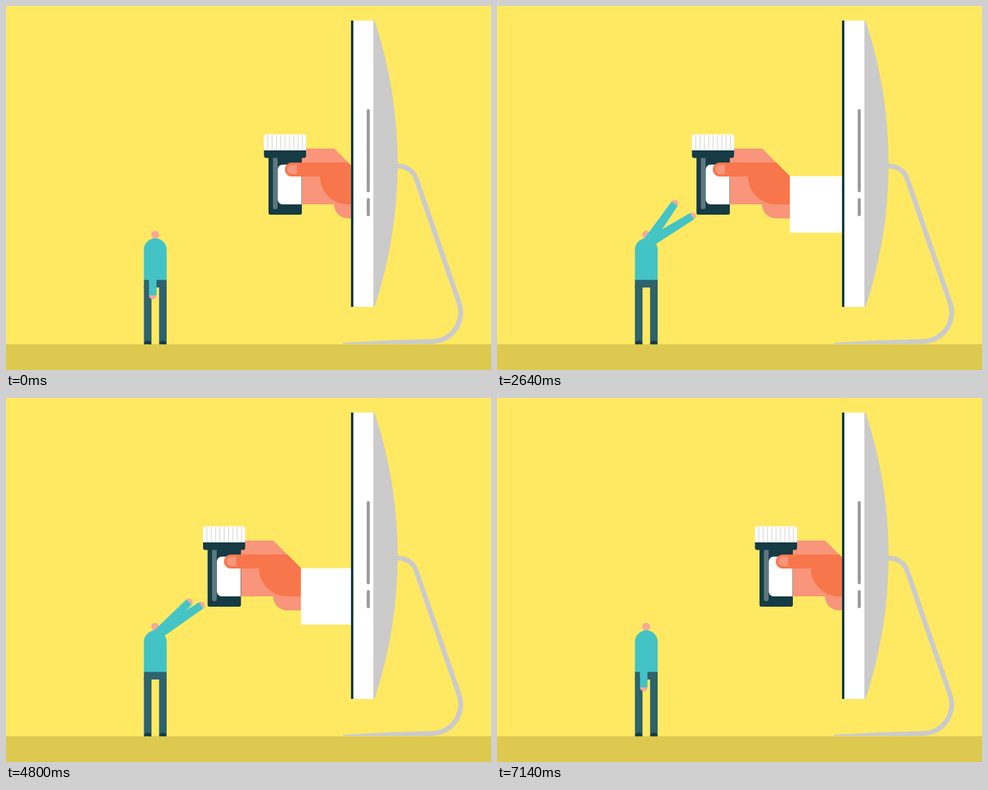
Recreate the animation shown at these times as an HTML page with a canvas. Size 800 by 600 pixels, loop 7.17 s.

```html
<!DOCTYPE html>
<html lang="en">
<head>
<meta charset="utf-8">
<title>Remote pharmacy</title>
<style>
  html, body { margin: 0; width: 100%; height: 100%; overflow: hidden; background: #ffe963; }
  canvas { display: block; width: 800px; height: 600px; }
</style>
</head>
<body>
<canvas id="stage" width="800" height="600"></canvas>
<script>
const LOOP = 7170, STEP = 30, MIRROR = 7178;
const SHUTTER = 16, WAVE = 520;
const C = {
  sky: '#ffe963', floor: '#ddc94f', dark: '#163b45', white: '#ffffff',
  metal: '#cbcbcb', slot: '#9b9b9b', rib: '#e2e2e2', shine: '#5b7880',
  palm: '#f8957a', thumb: '#f8764c', skin: '#f8a79c',
  shirt: '#43c3c5', pants: '#2e626d'
};

const ctx = document.getElementById('stage').getContext('2d');
const layer = document.createElement('canvas');
layer.width = 800;
layer.height = 600;
const lctx = layer.getContext('2d');

const mix = (a, b, k) => a + (b - a) * k;
const ease = (t, start, length) => {
  const s = Math.min(1, Math.max(0, (t - start) / length));
  return s * s * (3 - 2 * s);
};
const there = t => Math.min(t, MIRROR - t);

function rect(x, y, w, h, color) {
  ctx.fillStyle = color;
  ctx.fillRect(x, y, w, h);
}

function rounded(x, y, w, h, radii, color) {
  ctx.fillStyle = color;
  ctx.beginPath();
  ctx.roundRect(x, y, w, h, radii);
  ctx.fill();
}

function shape(color, trace) {
  ctx.fillStyle = color;
  ctx.beginPath();
  trace(ctx);
  ctx.fill();
}

function drawStand() {
  ctx.strokeStyle = C.metal;
  ctx.lineWidth = 8;
  ctx.beginPath();
  ctx.moveTo(640, 264);
  ctx.arc(648, 294, 30, -Math.PI / 2, -0.345);
  ctx.arc(702, 505, 48, -0.345, Math.PI / 2);
  ctx.stroke();
  shape(C.metal, p => {
    p.moveTo(703, 549);
    p.lineTo(635, 551);
    p.lineTo(556, 555);
    p.lineTo(556, 557.5);
    p.lineTo(703, 557);
  });
}

function drawMonitor() {
  shape(C.metal, p => {
    const a = Math.asin(236 / 752);
    p.moveTo(604, 24);
    p.arc(-106, 260, 752, -a, a);
    p.lineTo(604, 496);
  });
  rect(569, 24, 4.5, 472, C.dark);
  rect(573, 24, 33, 472, C.white);
  rounded(595, 170, 5, 137, 2.5, C.slot);
  rounded(595, 316.5, 5, 30, 2.5, C.slot);
}

function drawJar() {
  rounded(433, 244, 55, 100, [0, 0, 3, 3], C.dark);
  rounded(440.3, 250, 7.7, 85, [0, 0, 4, 4], C.shine);
  rounded(448.3, 261.5, 39.2, 65.5, [8, 0, 0, 8], C.white);
  rounded(425.5, 236, 69.5, 14.5, [0, 0, 4, 4], C.dark);
  rounded(425.5, 211.5, 69.5, 26.5, [4, 4, 0, 0], C.white);
  for (let i = 0; i < 9; i++) rect(430.8 + i * 7.15, 212, 1.9, 26, C.rib);
}

function drawGiver(t) {
  ctx.save();
  ctx.beginPath();
  ctx.rect(0, 0, 570, 600);
  ctx.clip();
  ctx.translate(-104 * ease(there(t), 36, 2634), 0);

  shape(C.palm, p => {
    p.moveTo(487, 235);
    p.lineTo(541.5, 235);
    p.lineTo(587, 280.5);
    p.lineTo(587, 350);
    p.lineTo(564, 350);
    p.arc(564, 327, 23, Math.PI / 2, Math.PI);
    p.lineTo(487, 327);
  });
  drawJar();
  shape(C.thumb, p => {
    p.moveTo(471.5, 258);
    p.lineTo(564.5, 258);
    p.lineTo(587, 280.5);
    p.lineTo(587, 327);
    p.lineTo(564, 327);
    p.arc(564, 281, 46, Math.PI / 2, Math.PI);
    p.lineTo(471.5, 281);
    p.arc(471.5, 269.5, 11.5, Math.PI / 2, Math.PI * 1.5);
  });
  rounded(464, 261.5, 16, 15.5, [7.7, 0, 0, 7.7], C.palm);
  rect(587, 280.5, 140, 93, C.white);
  ctx.restore();
}

// side: 1 is the near arm, -1 the far one
function armPose(t, side) {
  const lift = ease(there(t), 1735, 320);
  const phase = (t - 4800) / WAVE * Math.PI * 2;
  const reach = side * Math.cos(phase);
  const sway = side * Math.sin(phase);
  const raised = side > 0 ? 36 - 2 * reach + 4 * sway : 43 - 2.3 * reach + 13 * sway;
  return {
    lift,
    x: mix(242, 246, lift),
    y: 393,
    angle: -mix(-90, raised, lift) * Math.PI / 180,
    length: mix(84, 85.5 + 6 * reach, Math.min(1, lift * 2))
  };
}

function traceArm(g, pose) {
  const { x, y, angle, length, lift } = pose;
  const end = 6.2, root = end + 2 * lift;
  g.save();
  g.translate(x, y);
  g.rotate(angle);
  g.fillStyle = C.skin;
  g.beginPath();
  g.arc(length, 0, end, -Math.PI / 2, Math.PI / 2);
  g.fill();
  g.fillStyle = C.shirt;
  g.beginPath();
  g.arc(0, 0, root, Math.PI / 2, Math.PI * 1.5);
  g.lineTo(length, -end);
  g.lineTo(length, end);
  g.fill();
  g.restore();
}

// Averages several poses across the shutter time for motion blur
function drawArm(t, side) {
  const { lift } = armPose(t, side);
  if (lift === 0) {
    traceArm(ctx, armPose(t, side));
    return;
  }
  const n = lift < 1 ? 8 : 4;
  lctx.clearRect(0, 0, 800, 600);
  lctx.globalCompositeOperation = 'lighter';
  lctx.globalAlpha = 1 / n;
  for (let i = 0; i < n; i++) {
    traceArm(lctx, armPose(t + SHUTTER * ((i + 0.5) / n - 0.5), side));
  }
  ctx.drawImage(layer, 0, 0);
}

function drawPerson(t) {
  shape(C.skin, p => p.arc(246, 377, 6.5, 0, Math.PI * 2));
  drawArm(t, -1);
  rect(227.5, 451, 37.5, 13, C.pants);
  for (const x of [227.5, 252.5]) {
    rect(x, 460, 12.5, 97.5, C.pants);
    shape(C.dark, p => p.arc(x + 6.25, 557.5, 6, Math.PI, 0));
  }
  rounded(227.5, 383, 37.5, 68.5, [18.75, 18.75, 0, 0], C.shirt);
  drawArm(t, 1);
}

function draw(t) {
  rect(0, 0, 800, 600, C.sky);
  rect(0, 557.5, 800, 42.5, C.floor);
  drawStand();
  drawGiver(t);
  drawMonitor();
  drawPerson(t);
}

const begin = performance.now();
function tick() {
  const t = (performance.now() - begin) % LOOP;
  draw(Math.floor(t / STEP) * STEP);
  requestAnimationFrame(tick);
}
tick();
</script>
</body>
</html>
```
